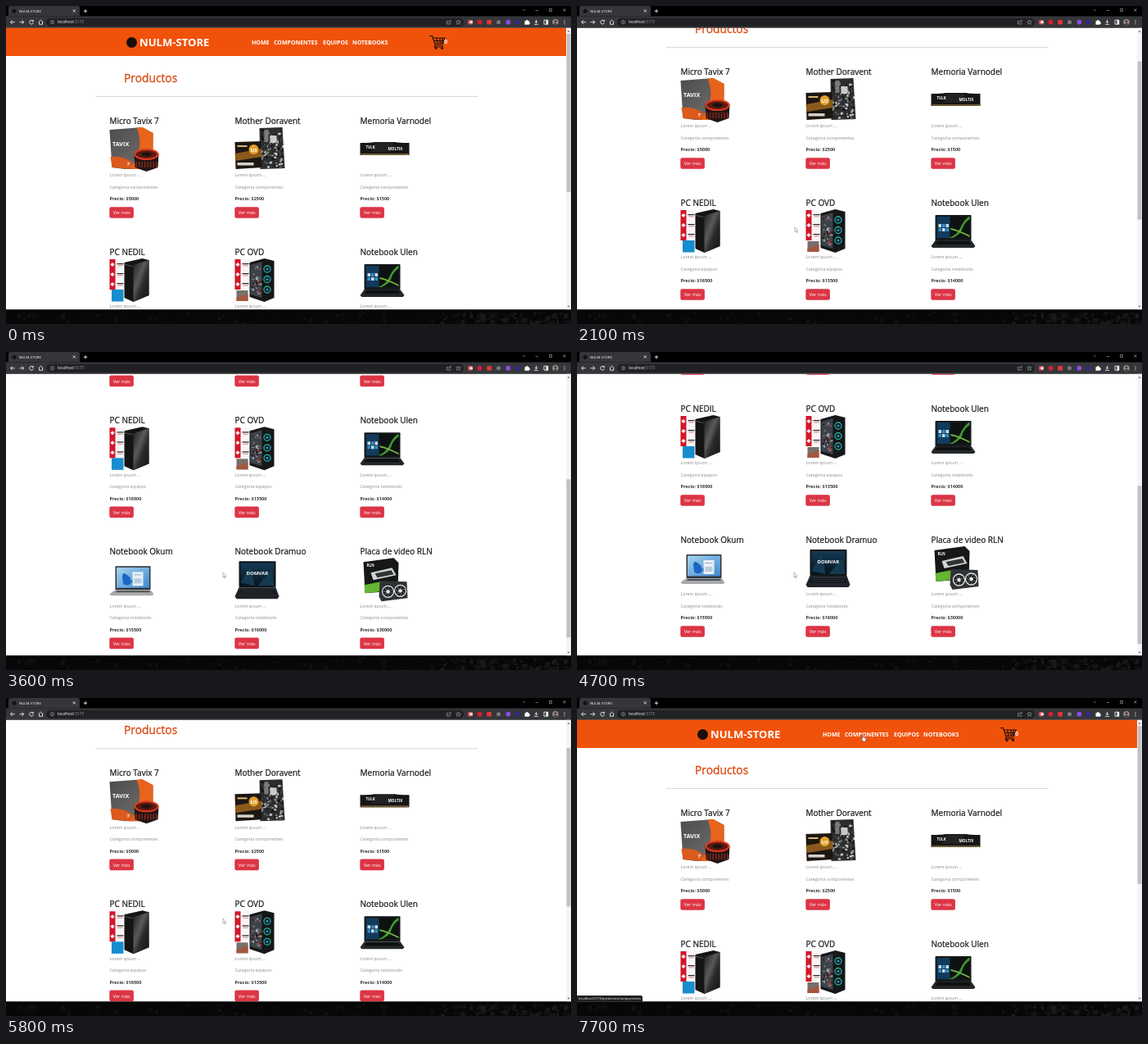
Recreate the animation shown at these times as an HTML page. Size 690 by 388 pixels, loop 8000 ms.

```html
<!DOCTYPE html>
<html lang="es">
<head>
<meta charset="utf-8">
<title>NULM-STORE</title>
<style>
  html, body { margin: 0; width: 100%; height: 100%; overflow: hidden; background: #000; }
  svg { display: block; width: 100vw; height: 100vh; }
  text { font-family: "Open Sans", "Noto Sans", sans-serif; white-space: pre; }
  .title { font-size: 10px; fill: #16191c; stroke: #16191c; stroke-width: .22; }
  .note { font-size: 5.3px; fill: #8c8c8c; }
  .price { font-size: 5.5px; font-weight: 700; fill: #343434; }
  .nav { font-size: 7px; font-weight: 700; fill: #fff; }
  .line { fill: none; stroke: #e8eaed; stroke-width: .9; }
  .thin { fill: none; stroke: #b4b6b9; stroke-width: .6; }
  .print { font-weight: 700; fill: #fff; }
</style>
</head>
<body>
<svg viewBox="0 0 690 388" preserveAspectRatio="none">
  <defs>
    <clipPath id="view"><rect y="26.5" width="684" height="344"/></clipPath>
    <linearGradient id="steel" x2="1" y2="1"><stop stop-color="#4b4d50"/><stop offset="1" stop-color="#77716d"/></linearGradient>
    <linearGradient id="glass" x2="1" y2="1"><stop stop-color="#1c1c1c"/><stop offset=".4" stop-color="#5a5a5a"/><stop offset=".6" stop-color="#2a2a2a"/><stop offset="1" stop-color="#151515"/></linearGradient>
    <linearGradient id="sky" x2="1" y2="1"><stop stop-color="#a6d4ee"/><stop offset="1" stop-color="#3f88d0"/></linearGradient>
    <linearGradient id="night" x2="0" y2="1"><stop stop-color="#153a55"/><stop offset="1" stop-color="#071420"/></linearGradient>
  </defs>

  <rect y="26.5" width="690" height="344" fill="#fff"/>
  <g clip-path="url(#view)"><g id="page">
    <rect y="26" width="684" height="35" fill="#f1520b"/>
    <circle cx="153.5" cy="44.5" r="6.5" fill="#1b0e08"/>
    <text x="163" y="49" font-size="13.1" font-weight="700" fill="#fff">NULM-STORE</text>
    <text class="nav" x="300" y="47.3">HOME</text>
    <text class="nav" x="327" y="47.3">COMPONENTES</text>
    <text class="nav" x="387" y="47.3">EQUIPOS</text>
    <text class="nav" x="423" y="47.3">NOTEBOOKS</text>
    <g fill="none" stroke="#261007" stroke-width="1.2">
      <path d="M517 36.5h3.500l3.800 11.500h9.500M521 39h15l-2.500 7h-10M522 42.500h13M525.500 39l1.500 7M530 39v7M533.500 39l-1.500 7M524.300 48l-1 2h11"/>
      <circle cx="525" cy="51.500" r="1"/><circle cx="532.500" cy="51.500" r="1"/>
    </g>
    <text class="nav" x="535" y="45.600">0</text>
    <text x="144" y="92.800" font-size="13.800" fill="#d9480f" stroke="#d9480f" stroke-width=".3">Productos</text>
    <path d="M109 110.400H576" stroke="#cfcfcf" stroke-width=".8"/>
    <g id="cards"></g>
  </g></g>

  <rect x="684" y="26.500" width="6" height="344" fill="#f4f4f4"/>
  <path d="M685.500 31.700l1.500-2 1.500 2zM685.500 365.800l1.500 2 1.500-2z" fill="#666"/>
  <rect id="thumb" x="684.600" y="34" width="4.800" height="193" fill="#c1c1c1"/>

  <rect width="690" height="12.500" fill="#000"/>
  <path d="M1 12.500q2 0 2-2V2q0-2 2-2h83q2 0 2 2v8.500q0 2 2 2z" fill="#35363a"/>
  <rect y="12.500" width="690" height="14" fill="#35363a"/>
  <circle cx="10" cy="6.200" r="2.500" fill="#111"/>
  <text x="16" y="7.800" font-size="4.300" fill="#fff">NULM-STORE</text>
  <g class="line">
    <path d="M81.800 4.400l3 3m0-3l-3 3M97 4v4.400M94.800 6.200h4.400"/>
    <path d="M10.800 19.700H5.500m2.400-2.400l-2.400 2.400 2.400 2.400M16.500 19.700h5.300m-2.400-2.400l2.400 2.400-2.400 2.400"/>
    <path d="M33 18.300a2.400 2.400 0 1 0 .4 2M33.400 16.800v1.900h-1.900M39.800 19.700l2.700-2.500 2.700 2.500M40.500 19.300v3h4v-3"/>
  </g>
  <path class="thin" d="M631 4.200l1.500 1.500 1.500-1.500M646.500 5.500h3.500M663.500 3.500h3v3h-3zM680.500 3.500l3 3m0-3l-3 3"/>
  <rect x="49" y="14.700" width="510" height="10.200" rx="5.100" fill="#202124"/>
  <g class="thin">
    <circle cx="56.500" cy="19.700" r="2.100"/><path d="M56.500 19.300v1.600M56.500 18.200v.5"/>
    <path d="M540 18.500h-1.600v3.500h4.500v-1.500M540.200 20.500q.3-2.500 3-2.500m-1-1.300l1.300 1.300-1.300 1.300"/>
    <path d="M552.500 17l.8 1.800 2 .2-1.500 1.300.5 2-1.800-1-1.800 1 .5-2-1.500-1.300 2-.2z"/>
  </g>
  <text x="63" y="21.400" font-size="4.750" fill="#fff">localhost<tspan fill="#9aa0a6">:5173</tspan></text>
  <rect x="564.300" y="17" width="5.500" height="5.500" rx="1" fill="#e5525a"/><rect x="566.500" y="18.500" width="3.300" height="2.500" fill="#fff"/>
  <circle cx="578.500" cy="19.700" r="2.900" fill="#d61f2d"/>
  <rect x="587.200" y="17" width="5.800" height="5.400" rx="1" fill="#e03535"/>
  <circle cx="601.500" cy="19.700" r="2.500" fill="#777b80"/>
  <circle cx="613.300" cy="19.700" r="2.900" fill="#8c4ce0"/>
  <circle cx="624.500" cy="19.700" r="2.500" fill="#2d2aa0"/>
  <path d="M633.500 18.300h1.500q0-1.600 1.200-1.600t1.200 1.600h1.500v1.400q1.200 0 1.200 1t-1.200 1v1h-5.400z" fill="#fff"/>
  <path class="line" d="M647.500 16.800v3.700m-1.700-1.600l1.700 1.700 1.700-1.700M645 22.300h5M657 17.200h4.800v5H657z"/>
  <rect x="659.500" y="17" width="2.500" height="5.500" fill="#eee"/>
  <circle cx="671" cy="19.700" r="3.700" fill="#9c8b87"/><path d="M668.300 22.200q2.700-3 5.400 0-2.700 2-5.400 0z" fill="#443a3a"/><circle cx="671" cy="18.700" r="1.500" fill="#443a3a"/>
  <g fill="#e8eaed"><circle cx="682" cy="17.600" r=".6"/><circle cx="682" cy="19.700" r=".6"/><circle cx="682" cy="21.800" r=".6"/></g>

  <rect y="370.500" width="690" height="17.500" fill="#070707"/>
  <g id="wallpaper"></g>

  <g id="status">
    <path d="M0 363h78q2 0 2 2v5.500H0z" fill="#202124"/>
    <text x="2" y="368.200" font-size="4.080" fill="#f1f1f1">localhost:5173/productos/componentes</text>
  </g>
  <path id="arrow" d="M0 0v6l1.300-1.200 1 2.100.8-.3-1-2.100h1.800z" fill="#fff" stroke="#666" stroke-width=".45"/>
  <path id="hand" d="M0 0q.8-.7 1.200.2v2.700l2.500.6q.9.3.8 1.200L4 8H.9L-1.300 5q.2-1.200 1.300-.2z" fill="#fff" stroke="#222" stroke-width=".45"/>
</svg>

<script>
const $ = id => document.getElementById(id);
const rect = (x, y, w, h, fill, more = "") => `<rect x="${x}" y="${y}" width="${w}" height="${h}" fill="${fill}" ${more}/>`;
const disc = (x, y, r, fill, more = "") => `<circle cx="${x}" cy="${y}" r="${r}" fill="${fill}" ${more}/>`;
const path = (d, fill) => `<path d="${d}" fill="${fill}"/>`;
const print = (x, y, size, words) => `<text class="print" x="${x}" y="${y}" font-size="${size}">${words}</text>`;
const repeat = (n, draw) => Array.from({ length: n }, (_, i) => draw(i)).join("");

let seed = 7;
const random = () => (seed = seed * 16807 % 2147483647) / 2147483647;
const specks = (n, x, y, w, h, size, shades) => repeat(n, () =>
  rect(x + random() * w, y + random() * h, size * (.4 + random()), size * (.4 + random()), shades[Math.floor(random() * shades.length)]));

const banner = rect(0, 1, 20, 37, "#f7f5f5") + rect(0, 1, 7, 37, "#d3172a") +
  repeat(3, i => path(`M3.500 ${5 + i * 12}l2.500 2.500-2.500 2.500L1 ${7.500 + i * 12}z`, "#fff") +
    rect(9, 6 + i * 12, 8, 1.200, "#222") + rect(10, 8.500 + i * 12, 6, .8, "#c66"));
const fan = (x, y) => disc(x, y, 7, "#1b1d1f", 'stroke="#e4e6e6" stroke-width="1.300"') +
  repeat(7, i => `<path d="M${x} ${y}q4 0 5 4" transform="rotate(${i * 360 / 7} ${x} ${y})" fill="none" stroke="#7d8082" stroke-width=".8"/>`) +
  disc(x, y, 2.200, "#e8e8e8");
const glow = y => disc(39.500, y, 4, "#10181d", 'stroke="#1fb59c" stroke-width="1.300"') + disc(39.500, y, 1.600, "#3f7fd0");

const art = {
  cpu: path("M0 3L40 0l13 7v39l-8 5H18L3 49z", "url(#steel)") +
    path("M33 .600L40 0l13 7v39l-8 5H24q20-24 9-50.400z", "#e8641b") +
    path("M1 36q15-2 27 7l-2 8-23-2z", "#dc5a1c") + print(21, 47, 6, "7") + print(3.500, 22.500, 7.200, "TAVIX") +
    path("M30 32q15-8 30 0l-1 17-14 5-14-5z", "#241515") +
    `<ellipse cx="45" cy="33" rx="14" ry="6" fill="#5a1a10" stroke="#e03a1c" stroke-width="2"/>` +
    `<ellipse cx="45" cy="33" rx="6" ry="2.500" fill="#1c1210"/>` +
    repeat(8, i => rect(32 + i * 3.500, 42, 1.300, 7, "#8d2c1d")),
  board: path("M30 1l28-1 3 50-30 1z", "#2b2d2f") + specks(110, 31, 2, 27, 46, 2.200, ["#111", "#555", "#8d8f91", "#c9cacb"]) +
    rect(36, 3, 5, 15, "#77797b") + rect(43, 10, 8, 9, "#c9cacb") +
    path("M0 18l32-1 1 32-32 2z", "#1d1712") + path("M0 32l33-6v10L1 41z", "#8a5a1c") +
    disc(23, 27, 6, "#e3a12b") + print(19, 29.500, 6, "U3") + rect(3, 22, 12, 2, "#ddb779") + rect(3, 43, 20, 3.500, "#d6d1c8"),
  memory: path("M0 19q14 0 17-1h26q3 1 17 1v15H0z", "#161616") + rect(1, 32, 58, 2, "#8c7440") +
    repeat(28, i => rect(2 + i * 2, 32, .6, 2, "#2c2519")) + path("M18 19h23l-4 11H14z", "#222") +
    print(7, 26, 4.300, "TULK") + print(34, 28, 4.600, "MOLTIX"),
  towerBlue: banner + path("M18 5L40 0l8 2v43l-19 8-11-5z", "#141414") + path("M29 8l19-6v43l-19 8z", "url(#glass)") +
    path("M19 7l9 2v1l-9-2z", "#555") + rect(2.500, 38, 14.500, 14.500, "#168dce"),
  towerLights: banner + path("M18 5L36 0l12 3v45l-12 5-18-6z", "#151719") + path("M19 8l14-4v44l-14-4z", "#3b4248") +
    specks(45, 19.500, 9, 12, 33, 2.200, ["#15191c", "#6f7a80", "#a5b0b6", "#913b3b"]) +
    glow(13) + glow(25.500) + glow(38) + rect(2, 39, 14, 13, "#77706c") + path("M2 48l14-5v9H2z", "#a4573f"),
  laptopGreen: rect(5, 7, 44, 31, "#16191a", 'rx="1"') + rect(7, 9, 40, 26, "#0d1210") + rect(7, 9, 16, 26, "#123a5c") +
    repeat(6, i => rect(9 + i % 3 * 4.500, 18 + Math.floor(i / 3) * 5, 3.500, 4, i % 2 ? "#2d91ca" : "#d0dbe2")) +
    path("M22 35q10-4 14-13t10-13h1v3q-7 5-9 12t-12 11z", "#3f9a32") + path("M24 23q9 2 23 9v2q-13-7-23-9z", "#76b83e") +
    path("M5 38h44l5 7-2 2H2l-2-2z", "#25282a") + path("M8 39h38l3 4H5z", "#0e1011"),
  laptopSilver: rect(7, 10, 43, 29, "#303438", 'rx="1"') + rect(8.500, 11.500, 40, 25, "url(#sky)") +
    path("M25 24q-13-13-8 8 9 4 10-5 14-13 7 6-7 2-9-9z", "#1b66c2") + rect(28, 17, 13, 17, "#e9f1f7") +
    rect(30, 20, 9, 1, "#9ab") + rect(30, 25, 9, 6, "#b6cce0") +
    path("M7 39h43l4 5-2 2H2l-2-2z", "#a7abae") + path("M9 40h39l2 2H7z", "#4c5155"),
  laptopDark: rect(5, 4, 45, 32, "#101417", 'rx="1"') + rect(7, 6, 41, 28, "url(#night)") +
    path("M7 30L19 9l5 25zM28 34L45 14l3 20z", "#153a50") + print(14, 21, 6, "DOMVAR") +
    path("M5 36h45l4 11-2 3H2l-2-3z", "#202429") + path("M8 38h39l3 6H5z", "#0b0e11") +
    repeat(3, i => rect(8 - i * .5, 38.500 + i * 2, 39 + i, .5, "#53616a")),
  graphics: path("M4 5L41 0l6 6-1 34-40 3z", "#161816") + path("M5 33l20-4v12L6 43z", "#64b632") +
    print(8, 11, 4.500, "RLN") + path("M13 18l26-6 5 9-28 6z", "#d2d5d3") + path("M18 19l20-4 3 5-20 4z", "#303432") +
    path("M24 28l33 1 1 20-32 4-3-6z", "#303336") + fan(34, 41) + fan(49, 40)
};

const items = [
  ["Micro Tavix 7", "componentes", 5000, "cpu"],
  ["Mother Doravent", "componentes", 2500, "board"],
  ["Memoria Varnodel", "componentes", 1500, "memory"],
  ["PC NEDIL", "equipos", 16500, "towerBlue"],
  ["PC OVD", "equipos", 13500, "towerLights"],
  ["Notebook Ulen", "notebooks", 14000, "laptopGreen"],
  ["Notebook Okum", "notebooks", 15500, "laptopSilver"],
  ["Notebook Dramuo", "notebooks", 16000, "laptopDark"],
  ["Placa de video RLN", "componentes", 30000, "graphics"]
];

$("cards").innerHTML = items.map(([name, kind, price, image], i) => `
  <g transform="translate(${126.5 + i % 3 * 153} ${148 + Math.floor(i / 3) * 160})">
    <text class="title" y="-4.500">${name}</text>
    ${art[image]}
    <text class="note" y="60.300">Lorem ipsum ...</text>
    <text class="note" y="74.800">Categoria ${kind}</text>
    <text class="price" y="89.200">Precio: $${price}</text>
    ${rect(-.2, 97.2, 29.6, 13.6, "#dc3545", 'rx="2.200"')}
    <text x="4.300" y="106.200" font-size="5.500" fill="#fff">Ver más</text>
  </g>`).join("");

$("wallpaper").innerHTML = specks(90, 0, 372, 690, 14, 4, ["#0c0c0c", "#111"]) +
  specks(90, 530, 373, 158, 13, 4, ["#0f0f0f", "#161616", "#1b1b1b"]);

const scrollKeys = [
  [1400, 0], [1700, 32], [1900, 36], [2100, 60], [2300, 72], [2600, 72], [2900, 143.5], [3100, 180],
  [3400, 180], [3700, 235], [3900, 243], [4600, 243], [4700, 231], [4900, 168], [5100, 135.5],
  [5300, 135.5], [5500, 76], [5600, 63], [5700, 63], [6000, 20], [6300, 0]
];
const pointerX = [[800, 15], [1200, 265], [1500, 265.5], [2100, 266], [2900, 265], [6600, 265], [7000, 285], [7500, 348.5]];
const pointerY = [[1200, 280.5], [1500, 280], [1700, 270], [2900, 269], [6600, 269], [7000, 190], [7500, 45]];

function at(keys, t) {
  const next = keys.findIndex(([time]) => time > t);
  if (next === 0) return keys[0][1];
  if (next < 0) return keys[keys.length - 1][1];
  const [t0, a] = keys[next - 1], [t1, b] = keys[next];
  return a + (b - a) * (t - t0) / (t1 - t0);
}

const start = performance.now();
function draw(now) {
  const t = Math.floor(Math.max(0, now - start) % 8000 / 100) * 100;
  const scroll = at(scrollKeys, t);
  $("page").setAttribute("transform", `translate(0 ${-scroll})`);
  $("thumb").setAttribute("y", 34 + scroll * .56);
  const spot = `translate(${at(pointerX, t)} ${at(pointerY, t)})`;
  $("arrow").setAttribute("transform", spot);
  $("hand").setAttribute("transform", spot);
  $("arrow").style.opacity = t >= 800 && t < 7500 ? 1 : 0;
  $("hand").style.opacity = t >= 7500 ? 1 : 0;
  $("status").style.opacity = t < 7600 ? 0 : t < 7700 ? .6 : 1;
  requestAnimationFrame(draw);
}
draw(start);
</script>
</body>
</html>
```
